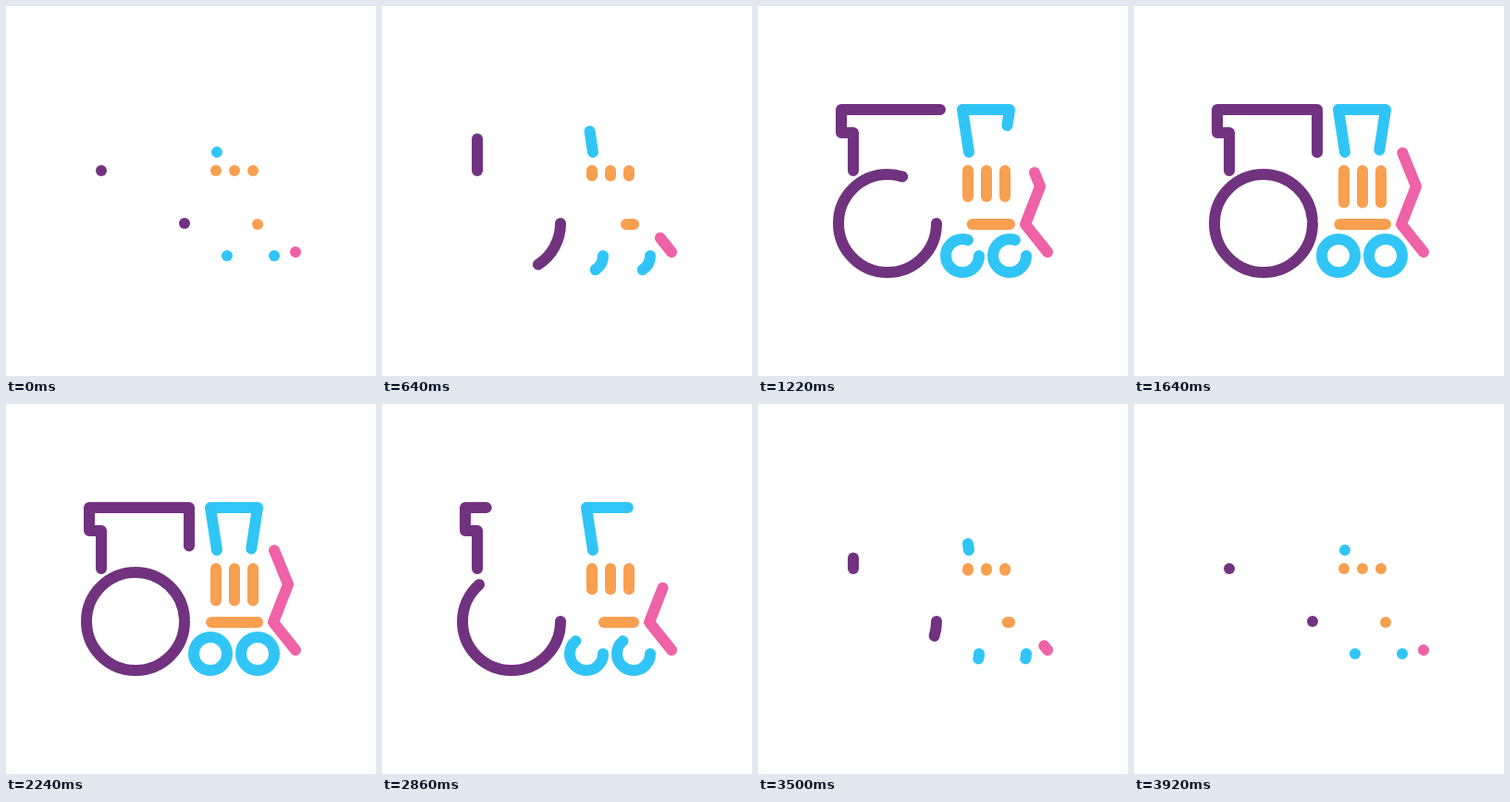
Animation of 400x400 px, one loop 3.96 s. Source, as an HTML page:

```html
<!DOCTYPE html>
<html>
<head>
<meta charset="utf-8">
<style>
html, body { margin: 0; width: 100%; height: 100%; overflow: hidden; background: #fff; }
svg { display: block; width: 100vw; height: 100vh; }
path { fill: none; stroke-width: 12; stroke-linecap: round; stroke-linejoin: round; }
.purple { stroke: #71327f; }
.blue { stroke: #30c5f6; }
.orange { stroke: #f89f50; }
.pink { stroke: #ef62a5; }
</style>
</head>
<body>
<svg viewBox="0 0 400 400">
  <path id="cab" class="purple" d="M103 178V137H90V112H198V163"/>
  <path class="purple" d="M193 235A53 53 0 0 1 87 235A53 53 0 0 1 193 235"/>
  <path class="blue" d="M228 158L221 112H272L265 158"/>
  <path class="blue" d="M239 270A18 18 0 0 1 203 270A18 18 0 0 1 239 270"/>
  <path class="blue" d="M290 270A18 18 0 0 1 254 270A18 18 0 0 1 290 270"/>
  <path class="orange" d="M227 178V213"/>
  <path class="orange" d="M247 178V213"/>
  <path class="orange" d="M267 178V213"/>
  <path class="orange" d="M272 236H221.5"/>
  <path class="pink" d="M313 266L289 236L305 195L289.5 157"/>
</svg>
<script>
const LOOP = 3960, HALF = 2000, LEAD = 40;
const lines = [...document.querySelectorAll('path')].map(el => ({
  el, length: el.getTotalLength(), cab: el.id === 'cab'
}));

const cubic = x => x < 0.5 ? 4 * x ** 3 : 1 - 4 * (1 - x) ** 3;

// Bezier easing with control points (a, 0) and (b, 1)
function bezier(x, a, b) {
  let lo = 0, hi = 1;
  for (let i = 0; i < 24; i++) {
    const s = (lo + hi) / 2, r = 1 - s;
    if (3 * a * s * r * r + 3 * b * s * s * r + s ** 3 < x) lo = s; else hi = s;
  }
  return lo * lo * (3 - 2 * lo);
}

function shown(t, cab) {
  const x = t / HALF;
  if (x < 1) return cubic(cab ? Math.max(0, x - 0.01) : x);
  return 1 - (cab ? bezier(x - 1, 0.45, 0.33) : cubic(x - 1));
}

const start = performance.now();
function draw(now) {
  const t = Math.max(0, now - start) % LOOP + LEAD;
  for (const { el, length, cab } of lines) {
    const dash = Math.max(0.01, shown(t, cab) * length);
    el.style.strokeDasharray = `${dash} ${length + 20}`;
  }
  requestAnimationFrame(draw);
}
draw(start);
</script>
</body>
</html>
```
